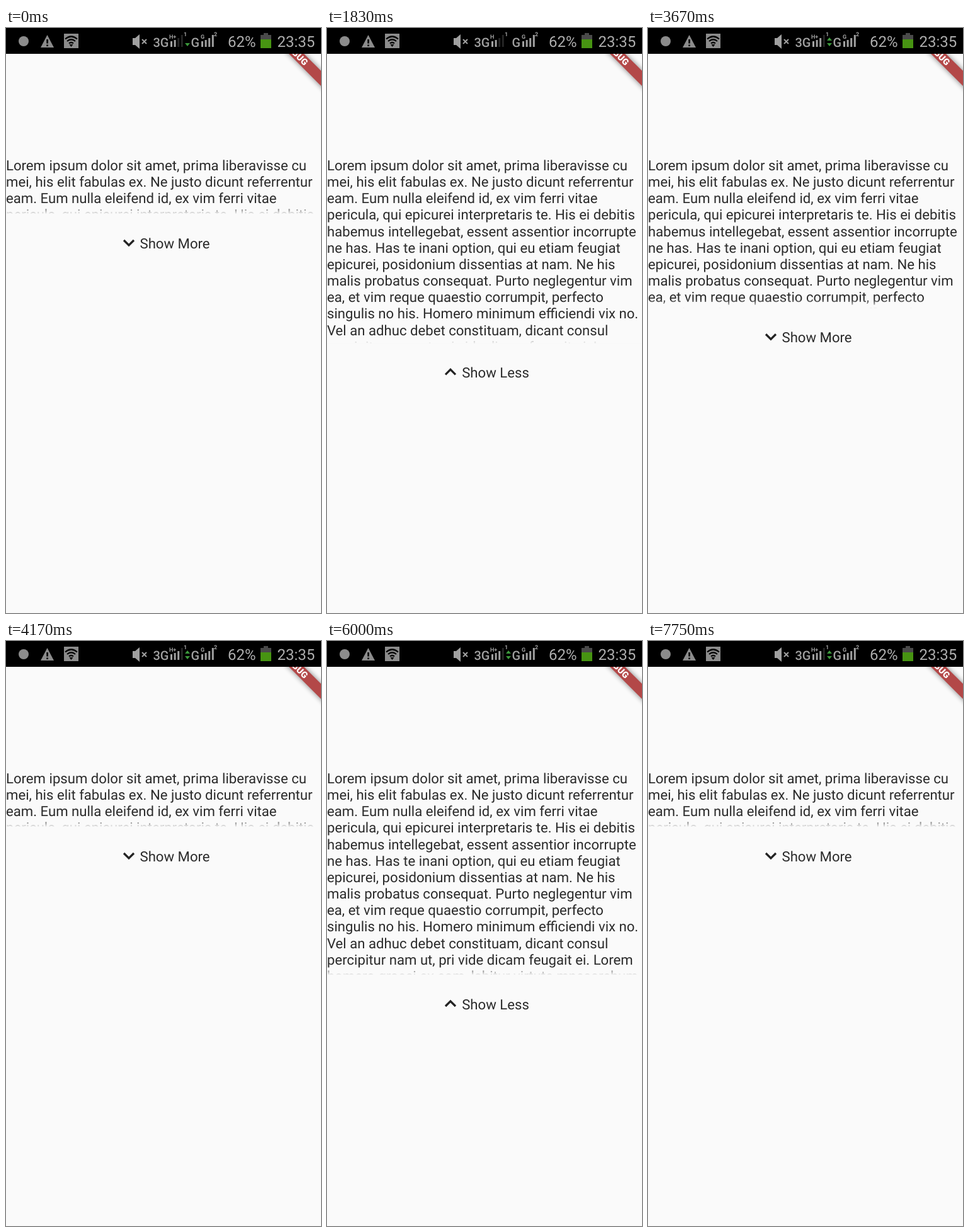
An HTML page for the animation above (8 s loop, 500 by 929 pixels).

```html
<!DOCTYPE html>
<html lang="la">
<head>
<meta charset="utf-8">
<title>Expandable text</title>
<style>
  html, body { margin: 0; width: 100%; height: 100%; overflow: hidden; background: #fafafa; }
  svg { display: block; width: 100%; height: 100%; }
  text { font-family: Roboto, Arial, sans-serif; text-rendering: geometricPrecision; }
  .body { font-size: 22.15px; fill: #2b2b2b; }
  .clock { font-size: 24px; fill: #adadad; }
  .net { font-size: 20px; font-weight: 500; fill: #a0a0a0; }
  .tiny { font-size: 9px; font-weight: 700; fill: #a0a0a0; }
</style>
</head>
<body>
<svg viewBox="0 0 500 929">
  <defs>
    <linearGradient id="fade" x2="0" y2="1">
      <stop stop-color="#fafafa" stop-opacity="0"/>
      <stop offset="1" stop-color="#fafafa"/>
    </linearGradient>
    <filter id="soft" x="-20%" y="-80%" width="140%" height="260%">
      <feGaussianBlur stdDeviation="4"/>
    </filter>
  </defs>
  <rect width="500" height="929" fill="#fafafa"/>
  <g id="lines" class="body"></g>

  <!-- Everything below the text's current bottom edge -->
  <g id="below">
    <rect y="-13" width="500" height="13.5" fill="url(#fade)"/>
    <rect width="500" height="700" fill="#fafafa"/>
    <path id="chevron" fill="none" stroke="#222" stroke-width="3.2"/>
    <text id="label" class="body" y="55"></text>
  </g>

  <g transform="translate(460 40) rotate(45)">
    <rect x="-80" y="-8.4" width="160" height="16.8" fill="#000" opacity=".5" filter="url(#soft)"/>
    <rect x="-80" y="-8.4" width="160" height="16.8" fill="#b34848"/>
    <text x="1" y="5" text-anchor="middle" font-size="14.2" font-weight="900" fill="#fff">DEBUG</text>
  </g>

  <rect width="500" height="41" fill="#000"/>
  <g fill="#8c8c8c">
    <circle id="dot" cx="28" cy="21"/>
    <path d="M65.500 11 76 31H55z"/>
    <path d="M64.300 18h2.600v6.500h-2.600zM64.300 26.500h2.600v2.500h-2.600z" fill="#000"/>
    <path d="M92 9h23v23H92z"/>
    <path d="M94 17.500q9.500-8 19 0M97 21q6.500-5.500 13 0M100 24.500q3.500-3 7 0"
      fill="none" stroke="#000" stroke-width="2.200"/>
    <path d="M100.500 26h6l-3 4z" fill="#000"/>
    <path d="M201 16h4l7-6v23l-7-6h-4z" fill="#a0a0a0"/>
    <path d="M216 18l7 7m0-7l-7 7" stroke="#a0a0a0" stroke-width="2"/>
  </g>
  <text class="net" x="233.500" y="29.500">3G</text>
  <text class="tiny" id="mode" x="259" y="17"></text>
  <g id="bars1"></g>
  <text class="tiny" x="282" y="13">1</text>
  <path id="down" d="M284 24h8l-4 5z" fill="#3c9a3c"/>
  <path id="up" d="M284 20h8l-4-5z" fill="#3c9a3c"/>
  <text class="net" x="293.500" y="29.500">G</text>
  <text class="tiny" x="309" y="17">G</text>
  <g id="bars2"></g>
  <text class="tiny" x="330" y="13">2</text>
  <text class="clock" x="352" y="30">62%</text>
  <path d="M409 8h7v3h5v21h-17V11h5z" fill="#4a4a4a"/>
  <path d="M404 18h17v14h-17z" fill="#479412"/>
  <text class="clock" x="430.500" y="30">23:35</text>
</svg>
<script>
const LOOP = 8000, MOVE = 730, SHORT = 295, TALL = 530;
const LINES = [
  'Lorem ipsum dolor sit amet, prima liberavisse cu',
  'mei, his elit fabulas ex. Ne justo dicunt referrentur',
  'eam. Eum nulla eleifend id, ex vim ferri vitae',
  'pericula, qui epicurei interpretaris te. His ei debitis',
  'habemus intellegebat, essent assentior incorrupte',
  'ne has. Has te inani option, qui eu etiam feugiat',
  'epicurei, posidonium dissentias at nam. Ne his',
  'malis probatus consequat. Purto neglegentur vim',
  'ea, et vim reque quaestio corrumpit, perfecto',
  'singulis no his. Homero minimum efficiendi vix no.',
  'Vel an adhuc debet constituam, dicant consul',
  'percipitur nam ut, pri vide dicam feugait ei. Lorem',
  'homero graeci ex eam, labitur virtute mnesarchum'
];
// Each tap swaps the label at once; the text starts moving at "start".
const TAPS = [
  { at: 1250, start: 1233, open: true },
  { at: 3330, start: 3337, open: false },
  { at: 4830, start: 4868, open: true },
  { at: 6500, start: 6503, open: false }
];
// Times at which the recording dot swaps between disc and ring
const BLINKS = [250, 500, 830, 1080, 1420, 1670, 2080, 2330, 2750, 3000, 3330, 3580, 3920, 4170,
  4500, 4830, 5170, 5420, 5670, 6000, 6250, 6500, 6830, 7080, 7500, 7750];

const $ = id => document.getElementById(id);
const set = (id, attrs) => {
  for (const name in attrs) $(id).setAttribute(name, attrs[name]);
};
const ease = x => x * (1.35 - 0.35 * x);

$('lines').innerHTML = LINES.map((line, i) =>
  `<text y="${(226 + i * 26.15).toFixed(2)}">${line}</text>`).join('');

function drawBars(id, x, lit) {
  $(id).innerHTML = [9, 11, 14, 19].map((h, i) =>
    `<rect x="${x + i * 5.6}" y="${30 - h}" width="3" height="${h}" fill="${i < lit ? '#a0a0a0' : '#262626'}"/>`).join('');
}
drawBars('bars2', 310, 4);

function draw(time) {
  // The screen refreshes twelve times a second.
  const t = Math.floor((time % LOOP + 5) * 0.012) / 0.012;
  const now = t + 5;

  const tap = TAPS.filter(p => now >= p.at).pop();
  const open = !!tap && tap.open;
  const x = tap ? Math.min(1, Math.max(0, (t - tap.start) / MOVE)) : 0;
  const amount = open ? ease(x) : tap ? ease(1 - x) : 0;

  set('below', { transform: `translate(0 ${SHORT + (TALL - SHORT) * amount})` });
  set('chevron', { d: open ? 'M188 50l8-8 8 8' : 'M187 42l8 8 8-8' });
  set('label', { x: open ? 214.2 : 212.5 });
  $('label').textContent = open ? 'Show Less' : 'Show More';

  const ring = BLINKS.filter(b => now >= b).length % 2;
  set('dot', ring
    ? { r: 7, fill: '#000', stroke: '#8c8c8c', 'stroke-width': 5.5 }
    : { r: 8, fill: '#8c8c8c', stroke: 'none' });

  $('mode').textContent = now >= 1250 && now < 3170 ? 'H' : 'H+';
  drawBars('bars1', 261, now < 2750 ? 2 : 3);
  set('down', { opacity: now < 1750 || now >= 3330 ? 1 : 0 });
  set('up', { opacity: now >= 3330 ? 1 : 0 });
}

const begin = performance.now();
(function tick() {
  draw(performance.now() - begin);
  requestAnimationFrame(tick);
})();
</script>
</body>
</html>
```
